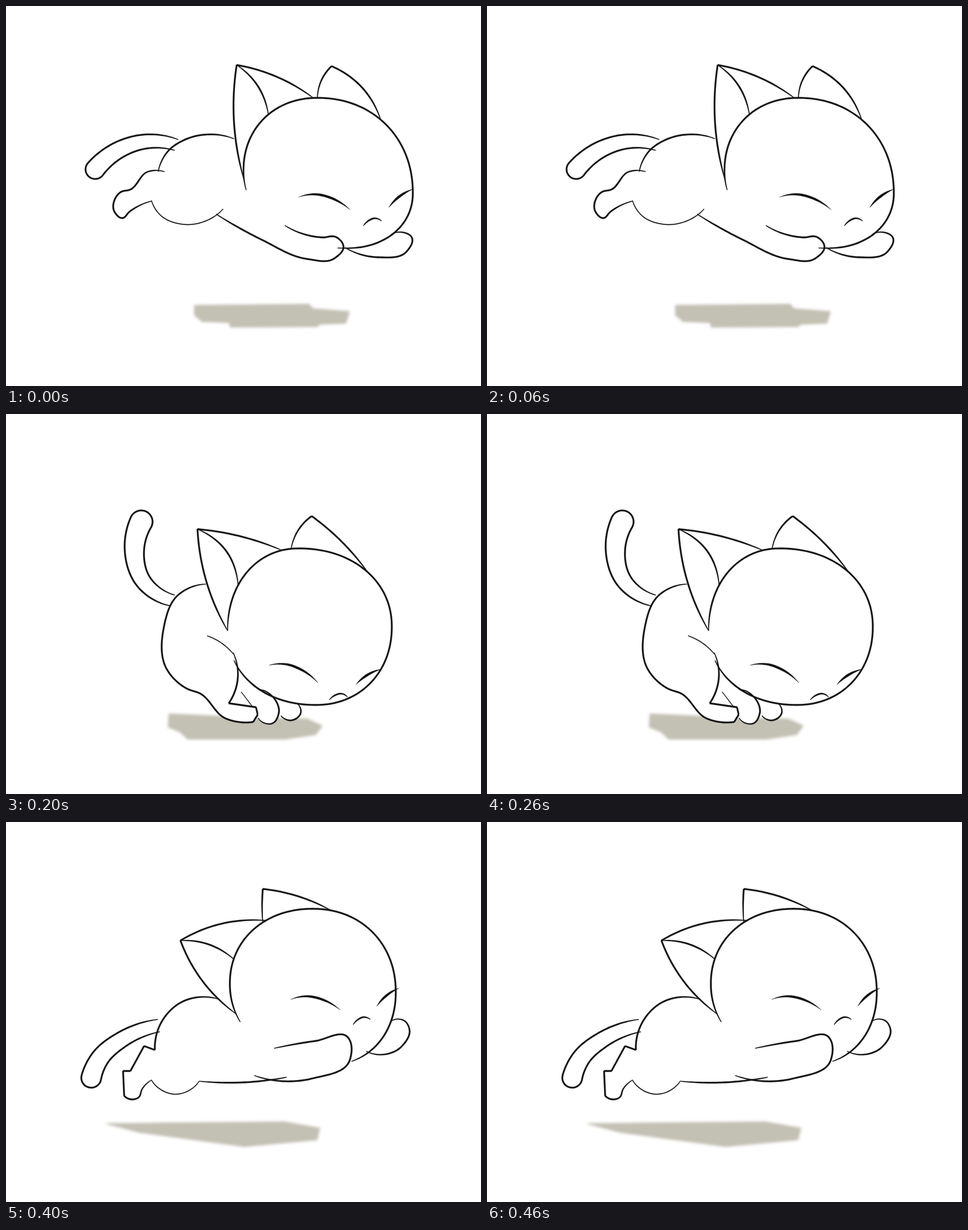
An HTML page that plays this animation: 836x670 px, repeating every 0.5 s.

```html
<!DOCTYPE html>
<html lang="en">
<head>
<meta charset="utf-8">
<title>Running cat</title>
<style>
html, body { margin: 0; width: 100%; height: 100%; overflow: hidden; background: #fff; }
svg { display: block; width: 836px; height: 670px; }
</style>
</head>
<body>
<svg id="stage" viewBox="0 0 836 670" xmlns="http://www.w3.org/2000/svg">
  <defs>
    <filter id="soft" x="-10%" y="-40%" width="120%" height="180%"><feGaussianBlur stdDeviation="2.4"/></filter>
  </defs>
</svg>
<script>
const HOLD = 100, INK = '#111', SHADE = '#c3c0b4';

// Brush: full width, end width, taper length
const BRUSH = {
  T: [2.8, 1.2, 60],
  F: [1.5, 1.2, 20],
  E: [4, 0.2, 60],
  M: [2.7, 0.9, 20]
};

// The same face in every pose, placed by x, y, turn and scale
const FACE = ['E 0,0 28,-2 57,8 86,31', 'E 153,34 170,19 197,7', 'M 106,61 118,52 126,50 138,56'];

// head: left, top, right and bottom points; arc: drawn part in quarter turns from the left point
// ears: start on head, bulge, tip, bulge, end on head [, inner bulge, inner end]
// tail: spine points and half widths at base and tip
// limbs: "brush points"; "/" marks a corner, "w" adds a white fill
const POSES = [
  {
    shadow: '332,528 533,526 540,534 604,539 598,559 551,561 548,565 395,566 393,558 345,556 332,545',
    head: '418,290 548,162 716,330 600,427', arc: [-0.15, 3.05],
    ears: [[-0.07, 0.055, 406, 104, 0.06, 0.97, 0.11, 0.55], [1, 0.1, 573, 106, 0.11, 1.45]],
    tail: '300,245 245,239 200,253 157,288', girth: [10, 17],
    face: [515, 337, -6, 1.02],
    limbs: [
      'T 268,292 288,253 312,237 401,234',
      'T 279,292 250,292 218,324 202,328 191,363 205,374 217,363 256,344',
      'F 256,343 272,369 312,385 382,358',
      'T 370,367 450,412 530,446 578,445 594,424 580,407 558,408 491,387',
      'T 597,426 655,443 705,433 715,410 676,406'
    ]
  },
  {
    shadow: '342,530 603,530 602,558 548,569 546,575 463,575 455,567 372,566 370,557 339,552',
    head: '429,340 566,213 723,345 612,474', arc: [0, 4],
    ears: [[0.04, 0.085, 456, 133, 0.045, 0.92, 0.05, 0.57], [1.05, 0.11, 614, 149, 0.045, 1.52]],
    tail: '361,237 285,211 222,224 197,246', girth: [10, 17],
    face: [512, 405, 0, 1],
    limbs: [
      'T 428,227 372,230 333,272 328,308 311,318 / 309,345 316,402 340,416 358,404 349,375',
      'T 340,360 375,391 414,401',
      'Tw 402,381 450,437 550,521 590,534 608,512 566,472',
      'T 598,474 655,511 685,503 682,488 660,466'
    ]
  },
  {
    shadow: '287,529 440,536 530,538 556,550 545,565 492,573 320,573 306,560 286,552',
    head: '390,382 515,237 679,375 545,513', arc: [0, 3.75],
    ears: [[0, 0.06, 337, 203, 0.04, 0.86, 0.15, 0.36], [0.94, 0.1, 538, 180, 0.04, 1.52]],
    tail: '295,329 241,294 226,238 238,190', girth: [10, 20],
    face: [463, 443, 0, 1],
    limbs: [
      'Tw 352,300 302,320 278,375 283,450 320,485 340,492 387,537 435,543 / 443,530 / 440,517 / 392,510 / 408,465 400,421',
      'F 354,391 378,403 400,423',
      'T 414,490 433,515',
      'Tw 444,486 480,528 470,545 444,536',
      'Tw 513,511 519,526 503,540 484,532'
    ]
  },
  {
    shadow: '217,543 247,525 470,527 501,545 445,576 285,576',
    head: '377,370 520,239 663,375 533,507', arc: [-0.2, 3.75],
    ears: [[-0.14, 0.07, 301, 257, 0.04, 0.72, 0.09, 0.27], [0.69, 0.05, 455, 187, 0.1, 1.2]],
    tail: '250,418 186,406 143,376 121,346', girth: [13, 21],
    face: [461, 428, -1, 0.98],
    limbs: [
      'Tw 327,333 272,362 250,415 268,478 300,516 / 302,544 / 350,553 398,552 405,530 398,518 / 386,523 374,518',
      'T 336,409 377,448 380,500 359,530',
      'T 398,518 408,500 440,482',
      'T 404,525 425,507 463,491'
    ]
  },
  {
    shadow: '178,532 490,529 552,540 547,560 420,572 235,547',
    head: '394,285 540,153 686,300 570,428', arc: [-0.3, 2.8],
    ears: [[-0.23, 0.075, 307, 209, 0.08, 0.63, 0.1, 0.2], [0.6, 0.02, 452, 118, 0.05, 1.13]],
    tail: '269,359 203,384 165,417 150,451', girth: [11, 17.5],
    face: [501, 313, -8, 0.97],
    limbs: [
      'T 376,313 310,317 270,360 262,402 / 243,395 / 219,439 / 206,439 / 208,483 / 220,489 233,486 240,470 256,455',
      'F 256,455 298,480 340,457',
      'T 340,457 420,459 494,450',
      'T 437,447 540,452 605,420 602,380 545,386 472,399',
      'T 634,404 695,397 710,365 702,351 678,351'
    ]
  }
];

const unit = (x, y) => { const l = Math.hypot(x, y) || 1; return [x / l, y / l]; };
const span = (a, b) => Math.hypot(b[0] - a[0], b[1] - a[1]);
const toward = (a, b) => unit(b[0] - a[0], b[1] - a[1]);
const points = text => text.trim().split(/\s+/).map(p => p.split(',').map(Number));
const poly = pts => 'M' + pts.map(p => p[0].toFixed(2) + ' ' + p[1].toFixed(2)).join('L') + 'Z';
const sample = (n, fn) => Array.from({ length: n + 1 }, (_, i) => fn(i / n));
const mirror = (t, u) => {
  const k = 2 * (t[0] * u[0] + t[1] * u[1]);
  return [k * u[0] - t[0], k * u[1] - t[1]];
};

// Smooth curve through the points
function smooth(pts) {
  const n = pts.length;
  if (n < 3) return pts;
  const tan = [];
  for (let i = 1; i < n - 1; i++) {
    const [a, b, c] = pts.slice(i - 1, i + 2);
    const u = toward(a, b), v = toward(b, c), lu = span(a, b), lv = span(b, c);
    tan[i] = unit(u[0] * lv + v[0] * lu, u[1] * lv + v[1] * lu);
  }
  tan[0] = mirror(tan[1], toward(pts[0], pts[1]));
  tan[n - 1] = mirror(tan[n - 2], toward(pts[n - 2], pts[n - 1]));
  const out = [pts[0]];
  for (let i = 0; i < n - 1; i++) {
    const p = pts[i], q = pts[i + 1], len = span(p, q);
    out.push(...sample(Math.max(3, Math.ceil(len / 4)), s => {
      const s2 = s * s, s3 = s2 * s;
      return [0, 1].map(d =>
        (2 * s3 - 3 * s2 + 1) * p[d] + (3 * s2 - 2 * s3) * q[d] +
        len * ((s3 - 2 * s2 + s) * tan[i][d] + (s3 - s2) * tan[i + 1][d]));
    }).slice(1));
  }
  return out;
}

// Shallow arc bowed to the left of its direction by a share of its length
const arc = (p, q, bulge) => sample(24, s => {
  const k = 4 * bulge * s * (1 - s), dx = q[0] - p[0], dy = q[1] - p[1];
  return [p[0] + dx * s + dy * k, p[1] + dy * s - dx * k];
});

// Point on the head, u in quarter turns clockwise from its left point
function headPoint([left, top, right, bottom], u) {
  const full = v => Math.sign(v) * Math.abs(v) ** 0.95;
  const c = full(Math.cos(u * Math.PI / 2)), s = full(Math.sin(u * Math.PI / 2));
  const cx = (s > 0 ? top : bottom)[0], cy = (c > 0 ? left : right)[1];
  return [
    cx - c * (c > 0 ? cx - left[0] : right[0] - cx),
    cy - s * (s > 0 ? cy - top[1] : bottom[1] - cy)
  ];
}

// Both edges of a band around a curve; radius(i) is half its width
function band(curve, radius) {
  const left = [], right = [];
  curve.forEach((p, i) => {
    const [ux, uy] = toward(curve[Math.max(0, i - 1)], curve[Math.min(curve.length - 1, i + 1)]);
    const r = radius(i);
    left.push([p[0] - uy * r, p[1] + ux * r]);
    right.unshift([p[0] + uy * r, p[1] - ux * r]);
  });
  return [left, right];
}

function tailLine(spine, [base, tip]) {
  const c = smooth(spine), n = c.length - 1;
  const [left, right] = band(c, i => base + (tip - base) * i / n);
  const [ux, uy] = toward(c[n - 1], c[n]);
  const cap = sample(16, s => {
    const x = Math.cos(s * Math.PI) * tip, y = Math.sin(s * Math.PI) * tip;
    return [c[n][0] - uy * x + ux * y, c[n][1] + ux * x + uy * y];
  });
  return [...left, ...cap.slice(1, -1), ...right];
}

function add(parent, tag, attrs) {
  const el = document.createElementNS('http://www.w3.org/2000/svg', tag);
  for (const k in attrs) el.setAttribute(k, attrs[k]);
  return parent.appendChild(el);
}

// Brush line along curves that meet at corners
function ink(parent, brush, pieces) {
  const [full, end, ramp] = BRUSH[brush];
  const length = pieces.reduce((sum, c) =>
    c.reduce((s, p, i) => i ? s + span(c[i - 1], p) : s, sum), 0);
  const reach = Math.min(ramp, length / 2);
  let run = 0;
  const d = pieces.map(c => poly(band(c, i => {
    if (i) run += span(c[i - 1], c[i]);
    const k = Math.max(0, Math.min(1, run / reach, (length - run) / reach));
    return (end + (full - end) * Math.sin(k * Math.PI / 2)) / 2;
  }).flat())).join('');
  add(parent, 'path', { d, fill: INK, stroke: INK, 'stroke-width': 0.3, 'stroke-linejoin': 'round' });
}

function drawStroke(parent, text) {
  const [kind] = text.split(' ', 1);
  let last = [];
  const pieces = text.slice(kind.length).split('/').map(part => {
    const pts = [...last, ...points(part)];
    last = pts.slice(-1);
    return smooth(pts);
  });
  if (kind[1] === 'w') add(parent, 'path', { d: poly(pieces.flat()), fill: '#fff' });
  ink(parent, kind[0], pieces);
}

function drawPose(parent, pose) {
  const g = add(parent, 'g', { visibility: 'hidden' });
  add(g, 'path', {
    d: poly(points(pose.shadow)), fill: SHADE, stroke: SHADE, 'stroke-width': 2,
    'stroke-linejoin': 'round', filter: 'url(#soft)'
  });
  ink(g, 'T', [tailLine(points(pose.tail), pose.girth)]);
  pose.limbs.forEach(s => drawStroke(g, s));

  const skull = points(pose.head), at = u => headPoint(skull, u), [from, to] = pose.arc;
  ink(g, 'T', [sample(160, s => at(from + (to - from) * s))]);
  for (const [u, b, x, y, b2, u2, b3, u3] of pose.ears) {
    const tip = [x, y];
    ink(g, 'T', [arc(at(u), tip, b), arc(tip, at(u2), b2)]);
    if (b3) ink(g, 'T', [arc(tip, at(u3), b3)]);
  }

  const [x, y, turn, size] = pose.face;
  const face = add(g, 'g', { transform: `translate(${x} ${y}) rotate(${turn}) scale(${size})` });
  FACE.forEach(s => drawStroke(face, s));
  return g;
}

const stage = document.getElementById('stage');
const groups = POSES.map(pose => drawPose(stage, pose));

function show(ms) {
  const now = Math.floor(ms / HOLD) % groups.length;
  groups.forEach((g, i) => g.setAttribute('visibility', i === now ? 'visible' : 'hidden'));
}

const start = performance.now();
function tick() {
  show(performance.now() - start);
  requestAnimationFrame(tick);
}
tick();
</script>
</body>
</html>
```
